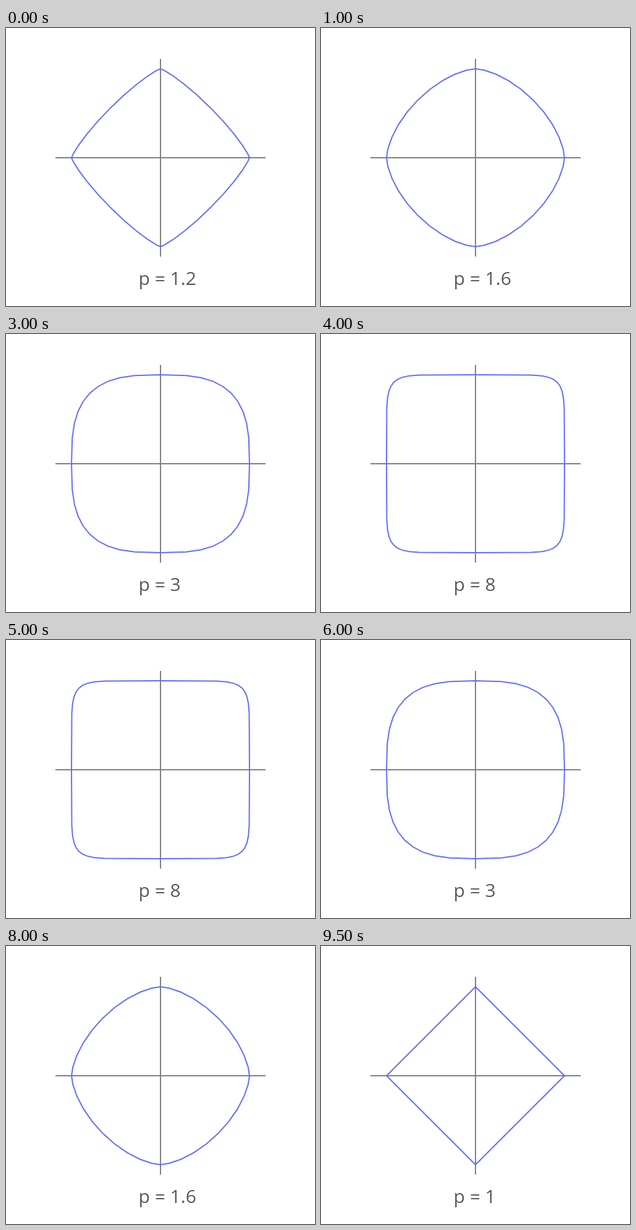
An HTML page that plays this animation: 500x450 px, repeating every 10000 ms.

```html
<!DOCTYPE html>
<html>
<head>
<meta charset="utf-8">
<title>Unit circles in p-norms</title>
<style>
  html, body { margin: 0; width: 100%; height: 100%; overflow: hidden; background: #fff; }
  svg { display: block; }
  text { font: 30px "Open Sans", sans-serif; fill: #5a5a5a; white-space: pre; }
</style>
</head>
<body>
<svg width="500" height="450" viewBox="0 0 500 450">
  <path d="M80 210H420M250 50V370" stroke="#808080" stroke-width="2"/>
  <polyline id="curve" fill="none" stroke="#636efa" stroke-width="2" stroke-miterlimit="2"/>
  <text id="label" x="214.5" y="416"></text>
</svg>
<script>
const STEP = 500, SEGMENTS = 40, RADIUS = 144, CX = 250, CY = 210;
const rising = [1.2, 1.4, 1.6, 1.8, 2, 2.5, 3, 5, 8];
const norms = [...rising, Infinity, ...rising.slice().reverse(), 1];
const curve = document.getElementById("curve");
const label = document.getElementById("label");

// Signed power of a sine or cosine; rounding keeps the axis points exact.
function power(value, exponent) {
  const v = Math.round(value * 1e9) / 1e9;
  return Math.sign(v) * Math.abs(v) ** exponent;
}

function outline(p) {
  return Array.from({ length: SEGMENTS + 1 }, (_, i) => {
    const a = i * 2 * Math.PI / SEGMENTS;
    const x = CX + RADIUS * power(Math.cos(a), 2 / p);
    const y = CY - RADIUS * power(Math.sin(a), 2 / p);
    return x.toFixed(2) + "," + y.toFixed(2);
  }).join(" ");
}

let shown = -1;
function draw(now) {
  const index = Math.floor(now / STEP) % norms.length;
  if (index !== shown) {
    const p = norms[index];
    curve.setAttribute("points", outline(p));
    label.textContent = "p = " + (p === Infinity ? "∞" : p);
    shown = index;
  }
}

const start = performance.now();
function tick() {
  draw(performance.now() - start);
  requestAnimationFrame(tick);
}
tick();
</script>
</body>
</html>
```
